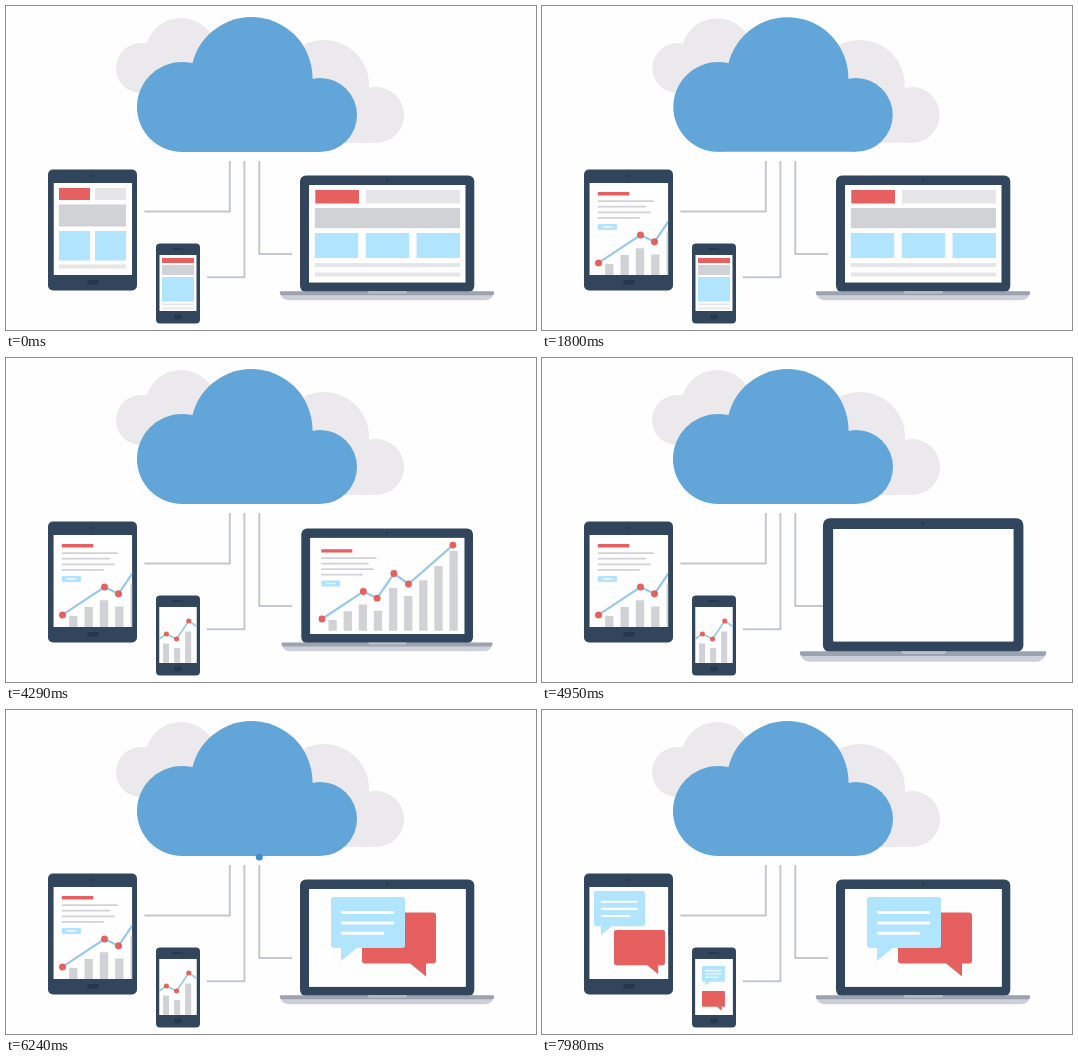
These frames come from a looping animation (530 px wide and 324 px high, 8 s). An HTML page with a canvas:

```html
<!DOCTYPE html>
<html lang="en">
<head>
<meta charset="utf-8">
<title>Cloud sync</title>
<style>
html, body { margin: 0; width: 100%; height: 100%; overflow: hidden; background: #fefefe; }
canvas { display: block; }
</style>
</head>
<body>
<canvas id="stage" width="530" height="324"></canvas>
<script>
const g = document.getElementById('stage').getContext('2d');
const LOOP = 8000;
const NAVY = '#31465c', DARK = '#25374a', RED = '#e5605f', BLUE = '#b0e4ff',
      PALE = '#e6e5e8', GRAY = '#d1d2d5', CLOUD = '#62a5d8', BACK = '#ebe9ec',
      WIRE = '#c4c7d2', DOT = '#3f8fca', WHITE = '#fefefe';

const part = (t, from, len) => Math.min(1, Math.max(0, (t - from) / len));

function backInOut(p) {
  const c = 2.595, u = 2 * p, v = u - 2;
  return p < .5 ? u * u * ((c + 1) * u - c) / 2 : (v * v * ((c + 1) * v + c) + 2) / 2;
}
const backOut = p => 1 + 2.7 * (p - 1) ** 3 + 1.7 * (p - 1) ** 2;

// Grows by 15 % at `up`, returns at `down`.
const swell = (t, up, down, len) =>
  1 + .15 * (backInOut(part(t, up, len)) - backInOut(part(t, down, len)));

function box(color, x1, y1, x2, y2, r = 0) {
  g.fillStyle = color;
  g.beginPath();
  g.roundRect(x1, y1, x2 - x1, y2 - y1, r);
  g.fill();
}

function disc(color, x, y, r) {
  g.fillStyle = color;
  g.beginPath();
  g.arc(x, y, r, 0, 7);
  g.fill();
}

function trace(points) {
  g.beginPath();
  points.forEach(([x, y]) => g.lineTo(x, y));
}

function stroke(points, color, width) {
  trace(points);
  g.strokeStyle = color;
  g.lineWidth = width;
  g.stroke();
}

function scaled(x, y, s, draw) {
  g.save();
  g.translate(x, y);
  g.scale(s, s);
  g.translate(-x, -y);
  draw();
  g.restore();
}

function cloud() {
  disc(BACK, 175, 48, 36);
  disc(BACK, 135, 62, 25);
  box(BACK, 135, 60, 190, 87);
  disc(BACK, 318, 79, 45);
  disc(BACK, 370, 109, 28);
  box(BACK, 300, 100, 370, 137);
  disc(CLOUD, 176, 101, 45);
  disc(CLOUD, 245.5, 72, 61);
  disc(CLOUD, 314, 109, 37);
  box(CLOUD, 176, 90, 314, 146);
}

// Chart in laptop coordinates, moved and scaled for the other screens.
const peaks = [[315, 261.4], [357, 233.5], [371, 240.3], [388, 215.3], [402.8, 225.9], [447.9, 186.4]];
const barTops = [262.5, 253.5, 246.8, 253, 230, 238, 222, 207.7, 192.5];

function chart(x, y, s, text) {
  g.save();
  g.translate(x, y);
  g.scale(s, s);
  if (text) {
    box(RED, 314.3, 190.6, 345.8, 194);
    [56, 48, 53, 42].forEach((w, i) =>
      box(GRAY, 314.3, 198.7 + 5.6 * i, 314.3 + w, 200.5 + 5.6 * i));
    box(BLUE, 314.3, 222.4, 333.5, 228.4, 1);
    box(WHITE, 319, 224.8, 329, 226);
  }
  barTops.forEach((top, i) => box(GRAY, 321.6 + 15.35 * i, top, 330 + 15.35 * i, 273.4));
  stroke(peaks, '#9ac9e2', 2.3);
  peaks.forEach(p => disc(RED, ...p, 3.5));
  g.restore();
}

function bubble(x, y, s, color, flip, p) {
  if (p <= 0) return;
  scaled(x + 37 * s, y + 26 * s, backOut(p), () => {
    const tail = d => flip ? 74 - d : d;
    g.translate(x, y);
    g.scale(s, s);
    box(color, 0, 0, 74, 51, 3);
    trace([[tail(10), 50], [tail(10), 64], [tail(27), 50]]);
    g.fill();
    if (!flip) [53, 53, 43].forEach((w, i) =>
      box(WHITE, 10, 14 + 10.4 * i, 10 + w, 17 + 10.4 * i));
  });
}

function chat(blue, red, s, t, start) {
  bubble(...red, s, RED, true, part(t, start + 130, 260));
  bubble(...blue, s, BLUE, false, part(t, start, 260));
}

function button(x, y, w, h) {
  box(DARK, x - w / 2, y - h / 2, x + w / 2, y + h / 2, h / 2);
}

const devices = [
  { // tablet
    center: [86.5, 224], grow: [400, 1180], screen: [47.5, 177, 126.2, 269],
    wipes: [[850, 360], [7380, 230]], chatAt: 7590,
    body() {
      box(NAVY, 42, 163.5, 131, 284.5, 5);
      disc(DARK, 86.5, 170, 1.2);
      button(87, 276.3, 12, 4.5);
    },
    pages: [() => {
      box(RED, 53, 182, 84, 194);
      box(PALE, 89, 182, 120, 194);
      box(GRAY, 53, 198.5, 120, 220.5);
      box(BLUE, 53, 225, 84, 254.5);
      box(BLUE, 89, 225, 120, 254.5);
      box(PALE, 53, 258.5, 120, 262.5);
    }, () => chart(-258.5, -4.5, 1, true),
    (t, at) => chat([52, 181], [72, 220], .69, t, at)]
  },
  { // phone
    center: [172, 277], grow: null, screen: [153.3, 249, 190.7, 305],
    wipes: [[3130, 480], [7380, 230]], chatAt: 7590,
    body() {
      box(NAVY, 150, 237.5, 194, 317.5, 4);
      button(172, 243, 10, 2);
      button(172, 311, 8, 4.5);
    },
    pages: [() => {
      box(RED, 156, 252, 188, 257);
      box(GRAY, 156, 259, 188, 269);
      box(BLUE, 156, 271, 188, 295.5);
      box(PALE, 156, 297.5, 188, 299.2);
      box(PALE, 156, 301.5, 188, 303.2);
    }, () => chart(-96.6, 107.9, .72, false),
    (t, at) => chat([160, 256], [160, 281], .31, t, at)]
  },
  { // laptop
    center: [381, 232], grow: [4150, 5600], screen: [303, 179, 459.7, 276.7],
    wipes: [[3130, 480], [4600, 340]], chatAt: 4990,
    body() {
      box(NAVY, 294, 169.5, 468.3, 286, 6);
      disc(DARK, 381, 174, 1.2);
      box('#cdd0d8', 274, 286, 488, 294.3, [0, 0, 9, 9]);
      box('#9ba3b0', 274, 285.3, 488, 289.3, [1, 1, 2, 2]);
      box('#b9bfc9', 362, 285.3, 401, 287.6, [0, 0, 2, 2]);
    },
    pages: [() => {
      box(RED, 309.3, 184, 353, 197.5);
      box(PALE, 360, 184, 454, 197.5);
      box(GRAY, 309, 202, 454, 222.3);
      for (const x of [308.8, 359.8, 410.6]) box(BLUE, x, 227, x + 43.4, 252);
      box(PALE, 309, 257, 454, 261);
      box(PALE, 309, 266.5, 454, 270.5);
    }, () => chart(0, 0, 1, true),
    (t, at) => chat([325, 187], [356, 202.5], 1, t, at)]
  }
];

function drawDevice(d, t) {
  const size = d.grow ? swell(t, ...d.grow, 600) : 1;
  const [x1, y1, x2, y2] = d.screen;
  scaled(...d.center, size, () => {
    d.body();
    d.pages.forEach((page, i) => {
      const shown = i ? part(t, ...d.wipes[i - 1]) : 1;
      if (!shown) return;
      g.save();
      g.beginPath();
      g.rect(x1, y1, (x2 - x1) * shown, y2 - y1);
      g.clip();
      box(WHITE, x1, y1, x2, y2);
      page(t, d.chatAt);
      g.restore();
    });
  });
}

// Wires run from the cloud to the tablet, phone and laptop.
const wires = [
  [[223.8, 155], [223.8, 205.5], [138.5, 205.5]],
  [[238.4, 155], [238.4, 271.3], [201, 271.3]],
  [[253.3, 155], [253.3, 248], [286, 248]]
];

// [wire, start, duration, towards the cloud]
const trips = [
  [0, 1440, 360, true], [1, 2740, 380, false], [2, 2740, 380, false],
  [2, 5890, 360, true], [0, 7040, 340, false], [1, 7040, 340, false]
];

function drawTrip([wire, start, len, up], t) {
  const p = (t - start) / len;
  if (p < 0 || p > 1) return;
  const [[x, ], [, y], [end]] = wires[wire];
  const top = 143.5, down = y - top, side = Math.abs(end - x);
  const way = (up ? 1 - p : p) * (down + side);
  disc(DOT, x + Math.sign(end - x) * Math.max(0, way - down), top + Math.min(way, down), 3.5);
}

function draw(t) {
  g.fillStyle = WHITE;
  g.fillRect(0, 0, 530, 324);
  wires.forEach(w => stroke(w, WIRE, 2));
  const size = swell(t, 1770, 2250, 480) + swell(t, 6250, 6740, 480) - 1;
  scaled(250, 78.5, size, cloud);
  trips.forEach(trip => drawTrip(trip, t));
  devices.forEach(d => drawDevice(d, t));
}

const began = performance.now();
function tick() {
  draw((performance.now() - began) % LOOP);
  requestAnimationFrame(tick);
}
tick();
</script>
</body>
</html>
```
